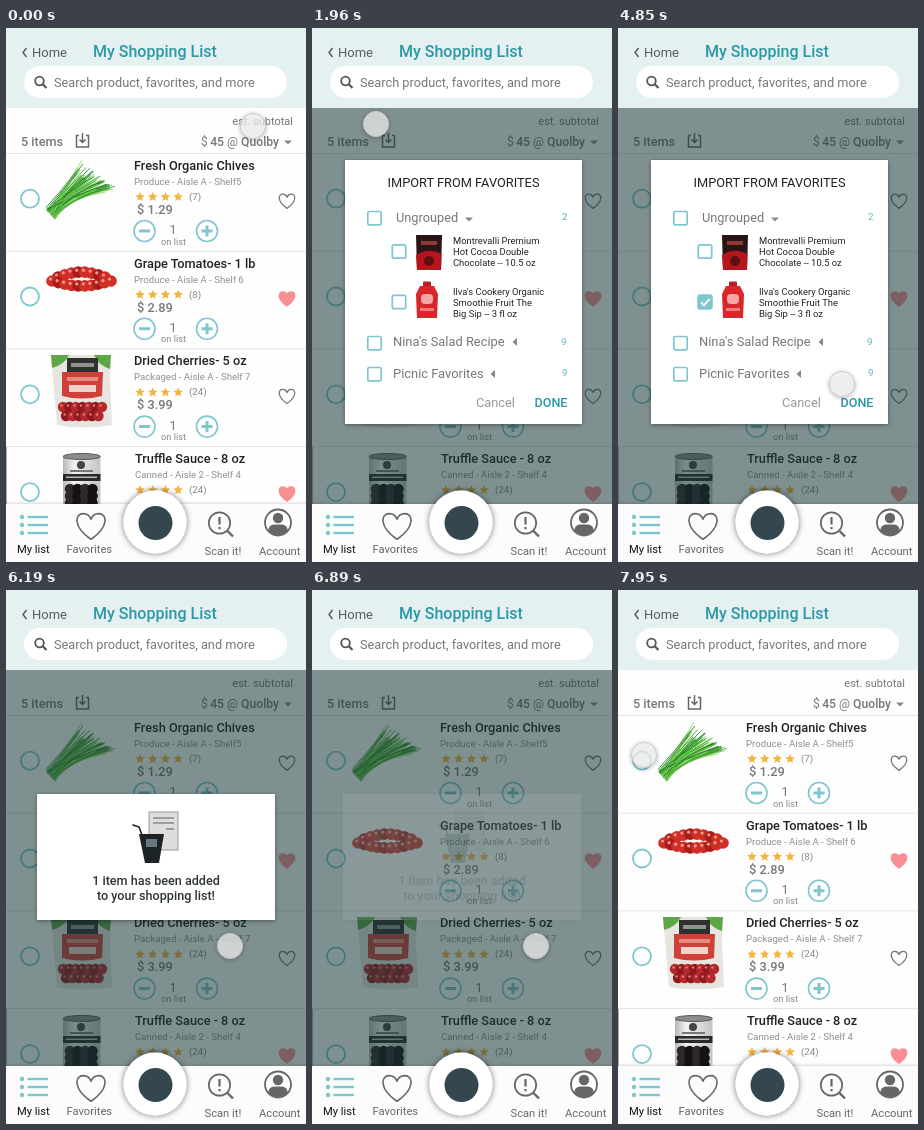
Animation, 300 px wide and 534 px high, one loop 7.99 s. Source, as an HTML page:

```html
<!DOCTYPE html>
<html lang="en">
<head>
<meta charset="utf-8">
<title>Shopping list</title>
<style>
html, body { margin: 0; width: 100%; height: 100%; overflow: hidden; background: #fff; }
svg { display: block; width: 100%; height: 100%; }
text { font-family: Roboto, sans-serif; white-space: pre; }
.m { font-weight: 500; }
</style>
</head>
<body>
<svg viewBox="0 0 300 534" xmlns="http://www.w3.org/2000/svg">
  <defs>
    <filter id="soft" x="-30%" y="-30%" width="160%" height="160%"><feDropShadow dx="0" dy="1" stdDeviation="2.2" flood-color="#000" flood-opacity=".4"/></filter>
    <filter id="deep" x="-40%" y="-40%" width="180%" height="180%"><feDropShadow dx="0" dy="0" stdDeviation="3" flood-color="#000" flood-opacity=".55"/></filter>
    <clipPath id="body"><rect y="80" width="300" height="396"/></clipPath>
    <linearGradient id="tin"><stop offset="0" stop-color="#b5b5b3"/><stop offset=".3" stop-color="#f2f2f0"/><stop offset="1" stop-color="#c4c4c2"/></linearGradient>
  </defs>
  <rect width="300" height="534" fill="#fff"/>
  <g id="list" clip-path="url(#body)"></g>
  <rect id="dim" y="80" width="300" height="396" fill="#18383a" fill-opacity=".55"/>
  <g id="head"></g>
  <g id="nav"></g>
  <g id="modal"></g>
  <g id="toast"></g>
  <g id="cursor" filter="url(#soft)"><circle r="12.5" fill="#f6f6f6" fill-opacity=".66" stroke="#c8c8c8" stroke-width="1"/></g>
</svg>
<script>
const LOOP = 7990;
const TEAL = '#2b98a8', AQUA = '#7fc6ce', GREY = '#777';
const el = id => document.getElementById(id);

let seed = 7;
const rnd = () => (seed = seed * 16807 % 2147483647) / 2147483647;

const text = (x, y, s, size, fill = GREY, extra = '') =>
  `<text x="${x}" y="${y}" font-size="${size}" fill="${fill}" ${extra}>${s}</text>`;
const med = (x, y, s, size, fill, extra = '') => text(x, y, s, size, fill, 'class="m" ' + extra);
const rect = (x, y, w, h, fill, extra = '') =>
  `<rect x="${x}" y="${y}" width="${w}" height="${h}" fill="${fill}" ${extra}/>`;
const circle = (x, y, r, fill, extra = '') => `<circle cx="${x}" cy="${y}" r="${r}" fill="${fill}" ${extra}/>`;
const path = (d, fill = 'none', extra = '') => `<path d="${d}" fill="${fill}" ${extra}/>`;
const line = (d, color, w, extra = '') => path(d, 'none', `stroke="${color}" stroke-width="${w}" ${extra}`);
const ring = (x, y, r, color, w) => circle(x, y, r, 'none', `stroke="${color}" stroke-width="${w}"`);
const MID = 'text-anchor="middle"', ROUND = 'stroke-linecap="round" stroke-linejoin="round"';

const heart = (x, y, k, fill, stroke, w) =>
  path('M0 7C-10 0-8.2-6.5-4.2-6.5C-2-6.5-.5-5 0-3.6C.5-5 2-6.5 4.2-6.5C8.2-6.5 10 0 0 7Z', fill,
    `transform="translate(${x} ${y}) scale(${k})" stroke="${stroke}" stroke-width="${w / k}" stroke-linejoin="round"`);

function star(x, y) {
  let d = '';
  for (let i = 0; i < 10; i++) {
    const r = i % 2 ? 2.3 : 5, a = i * Math.PI / 5;
    d += (i ? 'L' : 'M') + (x + r * Math.sin(a)).toFixed(1) + ' ' + (y - r * Math.cos(a)).toFixed(1);
  }
  return path(d + 'Z', '#f3b53f');
}

function chives() {
  let s = '';
  const greens = ['#3a9c2e', '#5cbf42', '#24802a', '#86d45f'];
  for (let i = 0; i < 80; i++) {
    const u = rnd(), v = rnd(), len = .55 + .45 * rnd();
    const x0 = 40 + 9 * v, y0 = 179 + 10 * v + 3 * rnd();
    const x1 = 62 + (14 + 36 * u) * len, y1 = 164 + (-33 + 28 * u) * len + 4 * rnd();
    s += line(`M${x0} ${y0}Q${56 + 9 * u} ${162 + 8 * u} ${x1} ${y1}`, greens[i % 4], .85);
  }
  return s;
}

function tomatoes() {
  let s = '';
  for (let i = 0; i < 18; i++) {
    const back = i < 8, u = back ? i / 7 : (i - 8) / 9, bulge = Math.sin(Math.PI * u);
    const x = back ? 52 + 47 * u : 46 + 59 * u, y = back ? 249 - 5 * bulge : 253 + 5 * bulge;
    s += circle(x, y, 5.8, i % 3 ? '#cf2f27' : '#a91c19') + circle(x - 1.5, y - 2, 1.6, '#f39a8c');
  }
  return s;
}

function cherryBag() {
  let s = path('M45 327H105L104 350L106 397Q76 402 51 397L47 350Z', '#e6e5e0')
    + path('M45 327H63Q58 337 46 340Z', '#5da845') + path('M88 327H105L104 341Q92 337 88 327Z', '#5da845')
    + path('M56 344H97L96 368Q76 373 56 368Z', '#cf4038') + rect(61, 330, 31, 14, '#30312f')
    + rect(65, 335, 23, 4, '#8f9490') + rect(61, 349, 31, 4, '#e58c80') + rect(63, 357, 27, 7, '#f3d3c9');
  for (let i = 0; i < 13; i++) {
    const x = 57 + (i % 7) * 6.5 + (i > 6 ? 3 : 0), y = i > 6 ? 388 : 379;
    s += circle(x, y, 5.2, i % 2 ? '#8e1a20' : '#b5282c') + circle(x - 1.5, y - 1.5, 1.2, '#dd7f7c');
  }
  return s;
}

function can() {
  let s = rect(57, 429, 37.5, 50, 'url(#tin)')
    + `<ellipse cx="75.700" cy="428.500" rx="18.700" ry="3" fill="#8d8d8b" stroke="#555"/>`
    + circle(75, 437, 4, '#444') + rect(64, 442, 23, 2, '#777') + rect(57, 446, 37.5, 7, '#2b2a2a')
    + rect(60, 448.500, 31, 1.5, '#bbb');
  for (let i = 0; i < 12; i++) s += circle(64 + (i % 4) * 7.5, 461 + Math.floor(i / 4) * 7, 5.3, i % 2 ? '#151214' : '#2e282b');
  return s;
}

function row(i, [name, place, votes, price, liked]) {
  const y = 125 + i * 97.7, c = 170.7 + i * 97.8;
  let s = rect(0, y, 300, 1, '#e4e4e4') + ring(24, c, 9, AQUA, 1.8);
  s += med(i < 3 ? 128 : 129, y + 17, name, 12.75, '#222') + text(i < 3 ? 128 : 129, y + 32, place, 9.65, '#8f8f8f');
  for (let k = 0; k < 4; k++) s += star(134 + k * 12.7, y + 44);
  s += text(183, y + 47, `(${votes})`, 9.8, '#888') + med(131, y + 61, '$ ' + price, 12.8, GREY);
  const by = c + 32.3;
  s += ring(138.5, by, 10.5, AQUA, 1.6) + ring(201, by, 10.5, AQUA, 1.6)
    + line(`M133 ${by}h11M195.500 ${by}h11M201 ${by - 5.5}v11`, AQUA, 3);
  s += text(167, by + 3, '1', 12.5, GREY, MID) + text(167.5, by + 13.5, 'on list', 9.2, '#888', MID);
  return s + heart(281, 173 + i * 97.6, 1.05, liked ? '#f98f92' : 'none', liked ? '#f98f92' : '#777', 1.3);
}

const items = [
  ['Fresh Organic Chives', 'Produce - Aisle A - Shelf5', 7, '1.29', 0],
  ['Grape Tomatoes- 1 lb', 'Produce - Aisle A - Shelf 6', 8, '2.89', 1],
  ['Dried Cherries- 5 oz', 'Packaged - Aisle A - Shelf 7', 24, '3.99', 0],
  ['Truffle Sauce - 8 oz', 'Canned - Aisle 2 - Shelf 4', 24, '4.99', 1]
];

el('list').innerHTML = rect(0, 80, 300, 396, '#fefefe')
  + text(287, 97, 'est. subtotal', 11, GREY, 'text-anchor="end"')
  + med(15, 118, '5 items', 12.6, GREY)
  + line('M73 107.500H70.500V119H82.500V107.500H80M76.500 105V114M73.500 111.500L76.500 114.500L79.500 111.500', '#666', 1.5)
  + text(195, 118, '$', 12)
  + med(273, 118, '45 <tspan font-weight="400">@</tspan> Quolby', 12.2, GREY, 'text-anchor="end"')
  + path('M278 112.500h8l-4 4z', '#888')
  + items.map((d, i) => row(i, d)).join('')
  + rect(0, 419, 1, 57, '#aaa')
  + chives() + tomatoes() + cherryBag() + can();

el('head').innerHTML = rect(0, 0, 300, 80, '#e5f1f1')
  + line('M20.500 20L17 24.500L20.500 29', '#555', 1.4)
  + text(26, 29, 'Home', 13, '#5c5c5c') + med(87, 29, 'My Shopping List', 16, TEAL)
  + rect(18, 38, 263, 32, '#fff', 'rx="16"')
  + ring(33.5, 53, 4.3, '#555', 1.8) + line('M36.800 56.300L40.500 60', '#555', 2.2)
  + text(48, 59, 'Search product, favorites, and more', 12.75);

let nav = rect(-10, 476, 320, 70, '#fcfcfc', 'filter="url(#soft)"');
for (let i = 0; i < 3; i++) {
  const y = 489 + i * 8;
  nav += circle(16, y, 2.2, AQUA) + line(`M21.500 ${y}H42`, AQUA, 2.4);
}
nav += text(11, 525, 'My list', 11.2, '#111')
  + heart(85, 498, 1.9, 'none', '#666', 1.6) + text(60.5, 525, 'Favorites', 11.2, '#666')
  + ring(213.5, 495, 10.7, '#666', 1.7) + line('M221.500 503L227 508.500', '#666', 2.4)
  + line('M213.500 489V496.500M213.500 499V501.200', '#666', 2.2)
  + text(198.5, 527, 'Scan it!', 11.2, '#666')
  + circle(272, 494.5, 13, '#fff', 'stroke="#666" stroke-width="1.8"') + circle(272, 490, 5.2, '#666')
  + path('M262 503Q263 496.500 268 496.500H276Q281 496.500 282 503Q272 511 262 503Z', '#666')
  + text(253, 527, 'Account', 11.2, '#666')
  + circle(149, 494, 31.5, '#fff', 'filter="url(#deep)"') + circle(149.5, 495, 17, '#34474f');
el('nav').innerHTML = nav;

const box = (x, y) => rect(x, y, 13.4, 13.4, '#fff', `rx="1.5" stroke="${AQUA}" stroke-width="1.7"`);
const lines = (y, ...rows) => rows.map((s, i) => text(141, y + i * 11, s, 9.4, '#222')).join('');

el('modal').innerHTML = rect(33, 132, 237, 264, '#fff', 'filter="url(#soft)"')
  + text(151.5, 159, 'IMPORT FROM FAVORITES', 12.8, '#222', MID)
  + box(55.8, 183.5) + text(84, 194, 'Ungrouped', 12.8) + path('M153 189.500h8l-4 4z', '#888')
  + text(250, 192, '2', 9.8, '#5bb5c0')
  + box(80.3, 216.8) + lines(216, 'Montrevalli Premium', 'Hot Cocoa Double', 'Chocolate -- 10.5 oz')
  + path('M104 207H130L129 242H105Z', '#2a1416') + path('M104 227Q117 219 129.500 226L129 242H105Z', '#b5151c')
  + rect(109, 213, 16, 4, '#8d3a36') + circle(117, 233, 5, '#5e0f12')
  + box(80.3, 267.3)
  + '<g id="tick">' + rect(79.5, 266.5, 15, 15, AQUA, 'rx="2"') + line('M83 274.300L86 277.300L91.500 271', '#fff', 1.9) + '</g>'
  + lines(267, "Ilva's Cookery Organic", 'Smoothie Fruit The', 'Big Sip -- 3 fl oz')
  + rect(111, 253.5, 8, 5, '#b91f22', 'rx="1"')
  + path('M108 258H122L126 266L125 290H105L104 266Z', '#d8262a') + rect(109, 266, 12, 10, '#f3aaa5', 'rx="4"') + rect(108, 280, 14, 3, '#ee7d78')
  + box(55.8, 308.5) + text(81, 318, "Nina's Salad Recipe", 12.9) + path('M205 310v8l-4.500-4z', '#888') + text(249, 317, '9', 9.8, '#5bb5c0')
  + box(55.8, 339.5) + text(81, 350, 'Picnic Favorites', 12.9) + path('M183 342v8l-4.500-4z', '#888') + text(250, 348, '9', 9.8, '#5bb5c0')
  + text(164, 379, 'Cancel', 12.8, '#999') + med(222.5, 379, 'DONE', 12.6, TEAL);

el('toast').innerHTML = rect(31, 204, 238, 126, '#fff', 'filter="url(#soft)"')
  + rect(143, 222, 29, 38, '#ddd', 'stroke="#999" stroke-width="1"') + line('M147 228h21M147 233h21M160 239h8', '#888', 1.6)
  + line('M127 235L133 237L136 245', '#1b2327', 1.6, ROUND) + path('M133 244H158L153 273H139Z', '#1b2327')
  + rect(140, 249, 11, 8, '#68777d')
  + med(150, 295, '1 item has been added', 12.6, '#2d3438', MID)
  + med(150, 310, 'to your shopping list!', 12.6, '#2d3438', MID);

// time, x, y and an optional bend point on the way there
const keys = [
  [0, 247, 98], [30, 247, 98], [70, 244, 107], [1530, 244, 107], [1830, 64, 96],
  [2360, 64, 96], [3150, 84, 251, 202, 165], [3190, 84, 251], [3255, 74, 265], [3320, 80, 256],
  [4320, 80, 256], [4710, 238, 365], [4850, 224, 356], [7450, 224, 356], [7950, 26, 165], [LOOP, 26, 165]
];
const ramp = (t, a, b) => Math.min(1, Math.max(0, (t - a) / (b - a)));

function cursorAt(t) {
  const i = Math.max(1, keys.findIndex(k => t <= k[0]));
  const [t0, x0, y0] = keys[i - 1];
  const [t1, x1, y1, bx = (x0 + x1) / 2, by = (y0 + y1) / 2] = keys[i];
  const u = ramp(t, t0, t1), e = u * u * (3 - 2 * u), f = 1 - e;
  return [f * f * x0 + 2 * f * e * bx + e * e * x1, f * f * y0 + 2 * f * e * by + e * e * y1];
}

function show(id, alpha) {
  el(id).style.opacity = alpha;
  el(id).style.display = alpha > 0 ? '' : 'none';
}

function draw(t) {
  const [x, y] = cursorAt(t), open = ramp(t, 1800, 1950);
  el('cursor').setAttribute('transform', `translate(${x.toFixed(2)} ${y.toFixed(2)})`);
  show('dim', t < 6960 ? open : 1 - ramp(t, 6960, 7150));
  show('modal', t < 5190 ? open : 0);
  show('tick', t >= 3255 ? 1 : 0);
  show('toast', t < 5190 ? 0 : 1 - ramp(t, 6190, 6950));
}

const start = performance.now();
function frame() {
  draw((performance.now() - start) % LOOP);
  requestAnimationFrame(frame);
}
frame();
</script>
</body>
</html>
```
